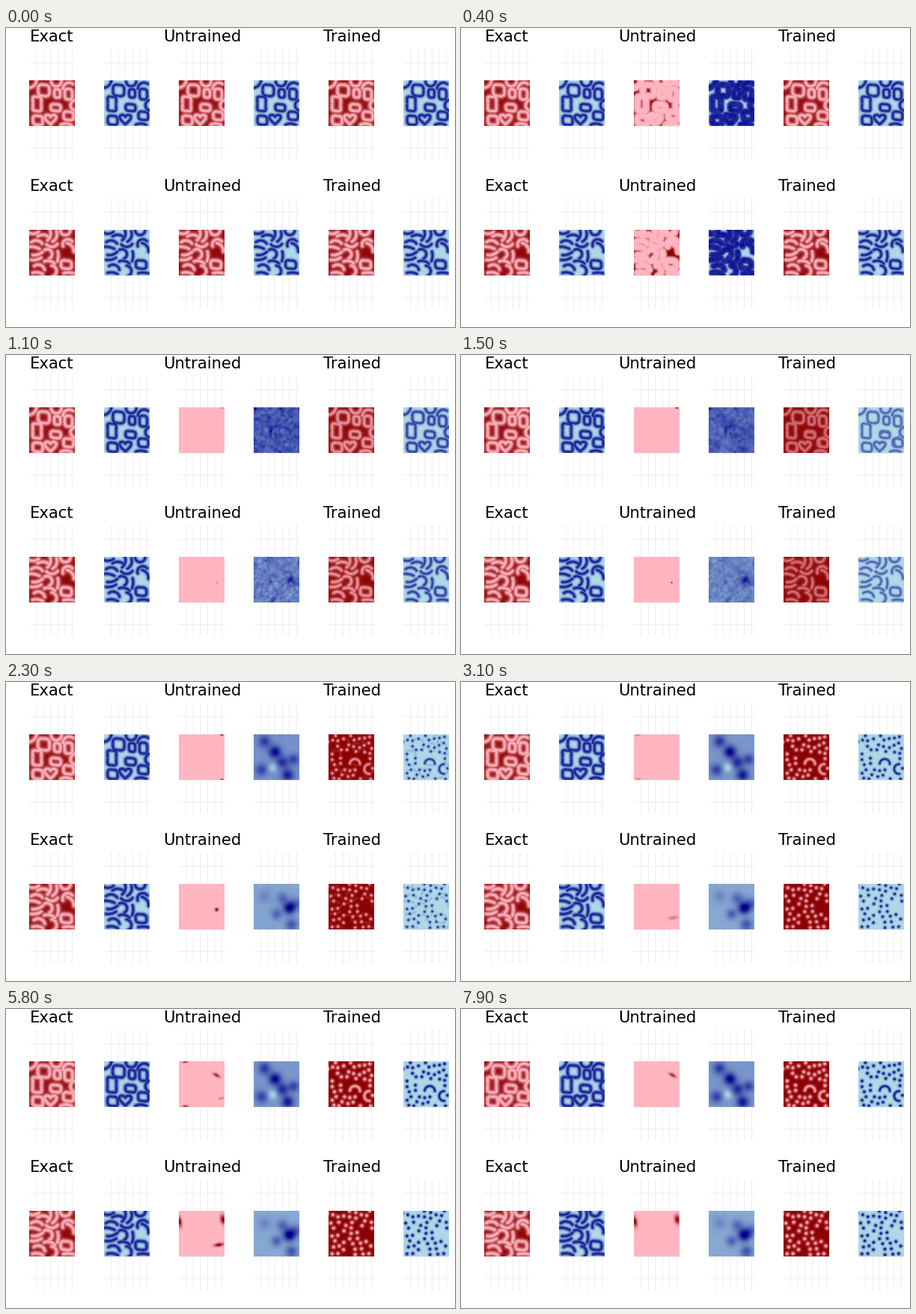
Animation, 600 px wide and 400 px high, one loop 8 s. Source, as a matplotlib script:

```python
import numpy as np
import matplotlib.pyplot as plt
from matplotlib.animation import FuncAnimation
from matplotlib.colors import LinearSegmentedColormap

FRAMES, INTERVAL = 80, 100
SIZE = 61
Y, X = np.mgrid[0:SIZE, 0:SIZE].astype(float)

RED = LinearSegmentedColormap.from_list("red", ["lightpink", "darkred"])
BLUE = LinearSegmentedColormap.from_list("blue", ["lightblue", "darkblue"])

# Rounded boxes: centre x, centre y, half width, half height
BOXES = [(35, 36, 6.5, 4.5), (11, 53, 6.5, 6), (52, 47, 6.5, 5.5),
         (37, 17, 4, 5.5), (52, 18, 5, 7)]
# Bent strokes: centre x, centre y, heading, bend
EDGES = [(5, 6, -.7, -1.4), (36, 5, 0, -3), (50, 5, -.5, 2.2),
         (57, 33, 1.6, -2.6), (49, 58, 0, 1)]
BRACKETS = [(35, 35, 0, 3), (50, 46, 1.6, -3.2)]
WORMS = [
    (5, 4, 0, -1.2), (18, 7, 0, 1.2), (10, 15, .1, 1.6), (27, 7, 1.8, 1.2),
    (35, 9, 1.9, 1.4), (48, 4, 0, -3.1), (49, 15, 2.7, -2.8), (56, 22, .9, 1.4),
    (7, 23, .2, .5), (30, 21, 0, -1.8), (11, 32, -.3, -.9), (27, 30, 1, 3.2),
    (38, 35, 1.6, .6), (9, 39, -.2, -.7), (27, 42, .2, 1.2), (14, 48, .3, 2),
    (11, 57, .1, .8), (34, 54, 1.4, 2.6), (52, 57, 0, .5),
]

# Soft clouds: x, y, radius, strength
CLOUDS = [
    [(14, 9, 8, .45), (28, 23, 8, .7), (38, 37, 8, .5), (45, 54, 8, .6),
     (10, 47, 8, .4), (53, 33, 7, .4), (25, 44, 6, -.3)],
    [(47, 32, 8, .8), (38, 19, 8, .3), (56, 26, 8, .3), (50, 54, 8, .4),
     (30, 40, 7, .35), (14, 16, 9, .15)],
]

# Dark spots: x, y, speed x, width, height, strength, start, end
SPOTS = [
    [(57, 0, 0, 1.8, 1.4, 1, .9, 3), (57, 60, 0, 2, 1.2, .8, 1.8, 3),
     (5, 0, 1.1, 4, 1.6, .8, 2.9, 7.3), (5, 60, 1, 4, 2, .75, 2.9, 6.8),
     (56, 49, 0, 3.5, 1.6, .35, 3.4, 6.4), (49, 18, .7, 5, 2.2, .8, 4.7, 9)],
    [(50, 34, 0, 1.2, 1.2, .9, .9, 1.9), (50, 34, 0, 2.4, 2.4, 1, 1.5, 3.1),
     (52, 45, .3, 6, 2.4, 1, 2.9, 6.4), (0, 14, .3, 2.8, 7, 1, 4.5, 9),
     (59, 11, -.5, 3.4, 6, 1, 4.7, 9)],
]


def ease(t, a, b):
    s = np.clip((t - a) / (b - a), 0, 1)
    return s * s * (3 - 2 * s)


def bell(d, width):
    return np.exp(-(d / width) ** 2)


def box(cx, cy, w, h, pinch=0):
    """Closed outline with soft corners, drawn in at the waist by pinch."""
    a = np.linspace(0, 2 * np.pi, 70)
    c, s = np.cos(a), np.sin(a)
    x = w * np.sign(c) * abs(c) ** .6 * (1 - pinch * (1 - s * s))
    y = h * np.sign(s) * abs(s) ** .6
    return np.column_stack([cx + x, cy + y + .08 * x])


def heart(cx, cy, r):
    a = np.linspace(0, 2 * np.pi, 80)
    y = .8 * np.cos(a) - .31 * np.cos(2 * a) - .12 * np.cos(3 * a)
    return np.column_stack([cx + r * np.sin(a) ** 3, cy - r * y])


def arc(cx, cy, heading, bend):
    length = 12 + 3 * abs(bend)
    s = np.linspace(-.5, .5, int(length / .7))
    angle = heading + bend * s
    step = length / len(s)
    path = step * np.column_stack([np.cos(angle), np.sin(angle)]).cumsum(0)
    return path - path.mean(0) + (cx, cy)


def distance(points):
    dx = X[..., None] - points[:, 0]
    dy = Y[..., None] - points[:, 1]
    return np.sqrt((dx * dx + dy * dy).min(-1))


def blur(field, sigma):
    f = np.fft.fftfreq(SIZE)
    k = np.exp(-2 * (np.pi * sigma) ** 2 * (f[:, None] ** 2 + f ** 2))
    return np.fft.ifft2(np.fft.fft2(field) * k).real


def blob(x, y, w, h, tilt=0):
    c, s = np.cos(tilt), np.sin(tilt)
    dx, dy = X - x, Y - y
    return np.exp(-((c * dx + s * dy) / w) ** 2 - ((c * dy - s * dx) / h) ** 2)


def scatter(strokes, gap, taken):
    """Dots along the strokes, none nearer than gap to another."""
    dots = []
    for p in np.vstack(strokes):
        if all(np.hypot(*(p - q)) >= gap for q in [*dots, *taken]):
            dots.append(p)
    return np.array(dots)


class Row:
    def __init__(self, strokes, kept, gap, clouds, spots, level, base, seed):
        grown = [s.mean(0) + 1.07 * (s - s.mean(0)) for s in strokes]
        self.start = distance(np.vstack(strokes))
        self.end = distance(np.vstack(grown))
        taken = np.vstack(kept) if kept else np.empty((0, 2))
        self.dots = distance(scatter(strokes, gap, taken))
        self.kept = distance(taken) if kept else np.full((SIZE, SIZE), 99.)
        self.haze = .2 * blur(bell(self.start, 3), 5)
        self.spots = spots
        noise = blur(np.random.default_rng(seed).normal(size=(SIZE, SIZE)), 1.4)
        self.noise = noise / noise.std()
        rim = np.clip((self.start - 4) / 5, 0, 1)
        self.mid = level + .45 * blur(rim, .8) + .06 * self.noise
        self.late = base + sum(a * blob(x, y, r, r) for x, y, r, a in clouds)

    def exact(self, t):
        g = 1 - np.exp(-t / 3)
        d = self.start + (self.end - self.start) * g
        u = 1 - .86 * bell(d, 3 + .35 * g) - self.haze
        return u, .86 * bell(d, 2.5 + .3 * g)

    def untrained(self, t):
        u, v = self.exact(0)
        d = self.start
        reach = 1.5 + 9.5 * min(t, 1.2)
        k = ease(t, 0, .25)
        flood = 1 / (1 + np.exp((d - reach) / .7))
        u = (1 - k) * u + k * (1 - flood)
        u = u * (1 - ease(t, .6, 1))
        for x, y, speed, w, h, a, on, off in self.spots:
            life = ease(t, on, on + .5) * (1 - ease(t, off - .5, off))
            if life > 0:
                tilt = .5 if speed == .7 else -.15
                u = u + a * life * blob(x + speed * (t - on), y, w, h, tilt)
        thick = (.87 + .03 * self.noise) / (1 + np.exp((d - reach + .7) / .7))
        v = (1 - k) * v + k * thick
        a, b = ease(t, .45, 1.1), ease(t, 1, 2.6)
        v = (1 - a) * v + a * ((1 - b) * self.mid + b * self.late)
        return u, v

    def trained(self, t):
        fade = 1 - ease(t, .4, 2.7)
        grow = ease(t, 1.2, 4)
        show = ease(t, .7, 1.9) * (.78 + .2 * grow)

        def mix(wide):
            line = .86 * fade ** .7 * bell(self.start, wide * (1.5 + fade))
            spot = show * bell(self.dots, wide * (1.7 + .6 * grow))
            kept = .9 * show * bell(self.kept, wide * (1.6 + .4 * grow))
            return np.maximum(line, np.maximum(spot, kept))

        return 1 - mix(1.2) - fade * self.haze, mix(1)


top = [box(*b) for b in BOXES] + [arc(*e) for e in EDGES]
top += [box(19, 13, 7.5, 7.5), box(10, 31, 8, 9.5, .3), heart(28, 51, 7.5)]
low = [arc(*w) for w in WORMS] + [box(49, 46, 7, 5.5)]
rows = [
    Row(top, [arc(*b) for b in BRACKETS], 6.8, CLOUDS[0], SPOTS[0], .6, .3, 4),
    Row(low, [], 7.3, CLOUDS[1], SPOTS[1], .42, .22, 9),
]

fig = plt.figure(figsize=(6, 4), dpi=100, facecolor="white")
ax = fig.add_axes([0, 0, 1, 1])
ax.axis("off")

images = []
for r in range(2):
    y0 = 200 * r
    for x, title in ((61.5, "Exact"), (262, "Untrained"), (462, "Trained")):
        ax.text(x, y0 + 18.5, title, ha="center", va="baseline",
                family="DejaVu Sans", fontsize=15.2, color="black")
    for c in range(6):
        x0 = 31 + 100 * c
        scale = 60.5 / 64
        xs = x0 + .5 + (np.arange(10, 61, 10) - .5) * scale
        ys = y0 + 100.5 - (np.arange(-30, 91, 30) - 32.5) * scale
        grid = dict(color="#eeeeee", lw=.72, zorder=1)
        ax.vlines(xs, y0 + 27, y0 + 176, **grid)
        ax.hlines(ys, x0, x0 + 61, **grid)
        images.append(ax.imshow(
            np.zeros((SIZE, SIZE)), cmap=BLUE if c % 2 else RED, vmin=0, vmax=1,
            extent=(x0, x0 + SIZE, y0 + 70 + SIZE, y0 + 70),
            interpolation="nearest", aspect="auto", zorder=2))
ax.set_xlim(0, 600)
ax.set_ylim(400, 0)


def draw(frame):
    t = frame * INTERVAL / 1000
    fields = [f for row in rows
              for pair in (row.exact(t), row.untrained(t), row.trained(t))
              for f in pair]
    for image, field in zip(images, fields):
        image.set_data(np.clip(field, 0, 1))
    return images


anim = FuncAnimation(fig, draw, frames=FRAMES, interval=INTERVAL,
                     repeat=True, repeat_delay=0, blit=False)
plt.show()
```
